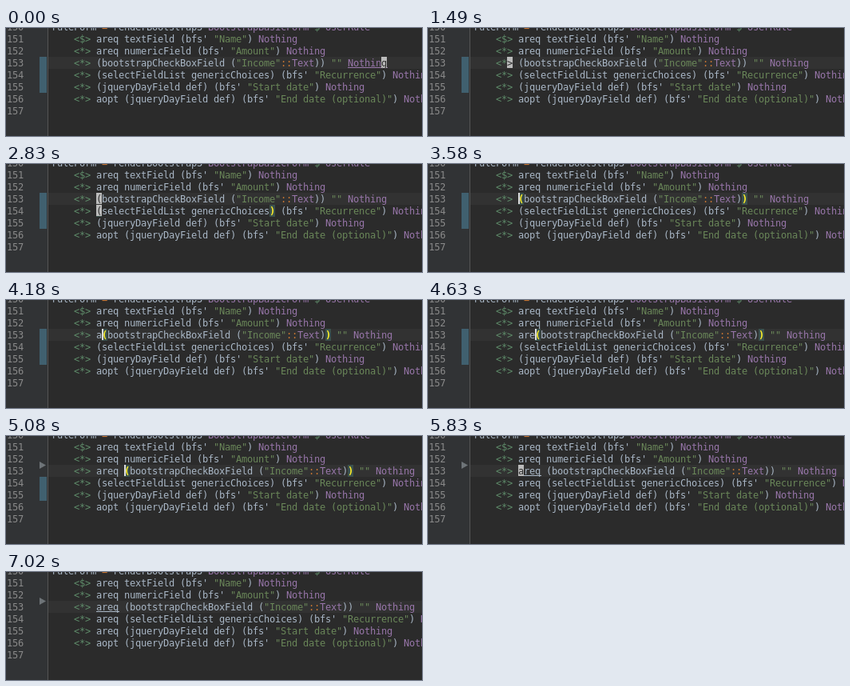
These frames come from a looping animation (521x135 px, 7.25 s). An HTML page:

```html
<!DOCTYPE html>
<html>
<head>
<meta charset="utf-8">
<style>
html, body { margin: 0; width: 100%; height: 100%; overflow: hidden; background: #2b2b2b; }
#stage { position: relative; width: 521px; height: 135px; overflow: hidden; background: #2b2b2b;
  font: 12px/14px "DejaVu Sans Mono", monospace; color: #a9b7c6; }
#stage div { position: absolute; white-space: pre; letter-spacing: calc(7px - 1ch); }
.str { color: #6a8759; }
.op { color: #5f8c6a; }
.key { color: #cc7832; }
.type { color: #9876aa; }
.hit { color: #d17ad6; }
.file { color: #8c8c8c; }
</style>
</head>
<body>
<div id="stage"></div>
<script>
const LOOP = 7250, CH = 7, LEFT = 57;
const stage = document.getElementById('stage');

// Text inserted before the bracket on line 153, with the caret behind it
const insert = typed => {
  const col = 8 + typed.length;
  return { typed, bar: col, carets: [], braces: [[col, 153], [col + 40, 153]] };
};

// Each step changes part of the editor state from its time on
const steps = [
  [0, { typed: '', carets: [[59, 153]], braces: [], under: [53, 7, '#9876aa'] }],
  [300, { carets: [] }],
  [750, { carets: [[59, 153]] }],
  [1050, { carets: [[4, 153]] }],
  [1350, { under: null }],
  [1490, { carets: [[6, 153]] }],
  [1790, { carets: [[7, 153]], braces: [[8, 153], [48, 153]] }],
  [2090, { carets: [[8, 153]] }],
  [2830, { carets: [[8, 153], [8, 154]], braces: [[8, 154], [39, 154]] }],
  [3130, { carets: [[8, 153], [8, 154], [8, 155]], braces: [[8, 155], [27, 155]] }],
  [3580, insert('')],
  [4180, insert('a')],
  [4480, { popup: true }],
  [4630, { ...insert('are'), popup: false }],
  [4780, insert('areq')],
  [5080, { ...insert('areq '), removed: true }],
  [5530, { bar: 0, braces: [], carets: [[8, 153]], done: true }],
  [5830, { under: [8, 4, '#a9b7c6'] }],
  [7020, { carets: [] }]
];

const completions = [
  ['appLogger', 0, 'Foundation.hs', ''],
  ['authEmail', 0, 'Patched.hs', 'YesodAuthEmail m => AuthPlugin m'],
  ['getApplicationDev', 3, 'Application.hs', 'IO (Int, Application)'],
  ['userRuleAmount', 8, 'Home.hs', ''],
  ['getExtra', 7, 'Foundation.hs', 'Handler Extra']
];

const esc = s => s.replace(/&/g, '&amp;').replace(/</g, '&lt;').replace(/>/g, '&gt;');
const span = (cls, s) => `<span class="${cls}">${esc(s)}</span>`;
const box = (x, y, w, h, bg, css = '') =>
  `<div style="left:${x}px;top:${y}px;width:${w}px;height:${h}px;background:${bg};${css}"></div>`;
const text = (x, y, html, css = '') => `<div style="left:${x}px;top:${y}px;${css}">${html}</div>`;
const rowY = n => 36 + (n - 153) * 15;
const colX = c => LEFT + c * CH;

const paint = line => line.replace(
  /("[^"]*")|(<.>|\$)|(::|=)|(\b[A-Z]\w*)|[^]/g,
  (s, str, op, key, type) =>
    str ? span('str', s) : op ? span('op', s) : key ? span('key', s) : type ? span('type', s) : esc(s));

function codeLines({ typed, done }) {
  const more = done ? 'areq ' : '';
  return [
    'ruleForm = renderBootstrap3 BootstrapBasicForm $ UserRule',
    '    <$> areq textField (bfs\' "Name") Nothing',
    '    <*> areq numericField (bfs\' "Amount") Nothing',
    `    <*> ${typed}(bootstrapCheckBoxField ("Income"::Text)) "" Nothing`,
    `    <*> ${more}(selectFieldList genericChoices) (bfs' "Recurrence") Nothing`,
    `    <*> ${more}(jqueryDayField def) (bfs' "Start date") Nothing`,
    '    <*> aopt (jqueryDayField def) (bfs\' "End date (optional)") Nothing',
    ''
  ];
}

function popup() {
  let out = box(94, 50, 440, 100, '#45484a', 'box-sizing:border-box;border:1px solid #515456');
  out += box(95, 51, 430, 17, '#55585a');
  completions.forEach(([name, hit, file, type], i) => {
    const y = 51 + i * 17;
    const label = esc(name.slice(0, hit)) + span('hit', name[hit]) + esc(name.slice(hit + 1));
    out += box(98, y + 4, 10, 10, '#8f8f8f', 'border-radius:50%');
    out += text(114, y + 2, label + span('file', ` (${file})`), 'color:#bbb');
    out += text(575 - type.length * CH, y + 2, esc(type), 'color:#bbb');
  });
  return out;
}

function view(s) {
  const lines = codeLines(s);
  const glyph = (col, row) => esc(lines[row - 150][col] || ' ');
  let out = box(0, 0, 52, 135, '#313335') + box(52, 0, 1, 135, '#555');
  out += box(53, 36, 468, 15, '#323232');

  if (!s.done) {
    const top = s.removed ? 51 : 36;
    out += box(42, top, 9, 81 - top, '#40606f');
  }
  if (s.removed) out += box(42, 32, 8, 9, '#6e7478', 'clip-path:polygon(0 0,100% 50%,0 100%)');

  lines.forEach((line, i) => {
    const y = rowY(150 + i) + 1;
    out += text(1, y, 150 + i, 'color:#8a8a8a') + text(LEFT, y, paint(line));
  });

  if (s.under) {
    const [col, len, color] = s.under;
    out += box(colX(col), 49, len * CH + 1, 1, color);
  }
  for (const [col, row] of s.braces) {
    out += box(colX(col), rowY(row), CH, 15, '#3b514d');
    out += text(colX(col), rowY(row) + 1, glyph(col, row), 'color:#ffef28;font-weight:bold');
  }
  for (const [col, row] of s.carets) {
    out += box(colX(col), rowY(row), CH, 14, '#bbb');
    out += text(colX(col), rowY(row) + 1, glyph(col, row), 'color:#2b2b2b');
  }
  if (s.bar) out += box(colX(s.bar), 36, 2, 14, '#ddd');
  if (s.popup) out += popup();
  return out;
}

let shown = 0;
function tick() {
  const t = performance.now() % LOOP;
  const past = steps.filter(([at]) => at <= t);
  if (past.length !== shown) {
    shown = past.length;
    stage.innerHTML = view(Object.assign({}, ...past.map(([, change]) => change)));
  }
  requestAnimationFrame(tick);
}
tick();
</script>
</body>
</html>
```
